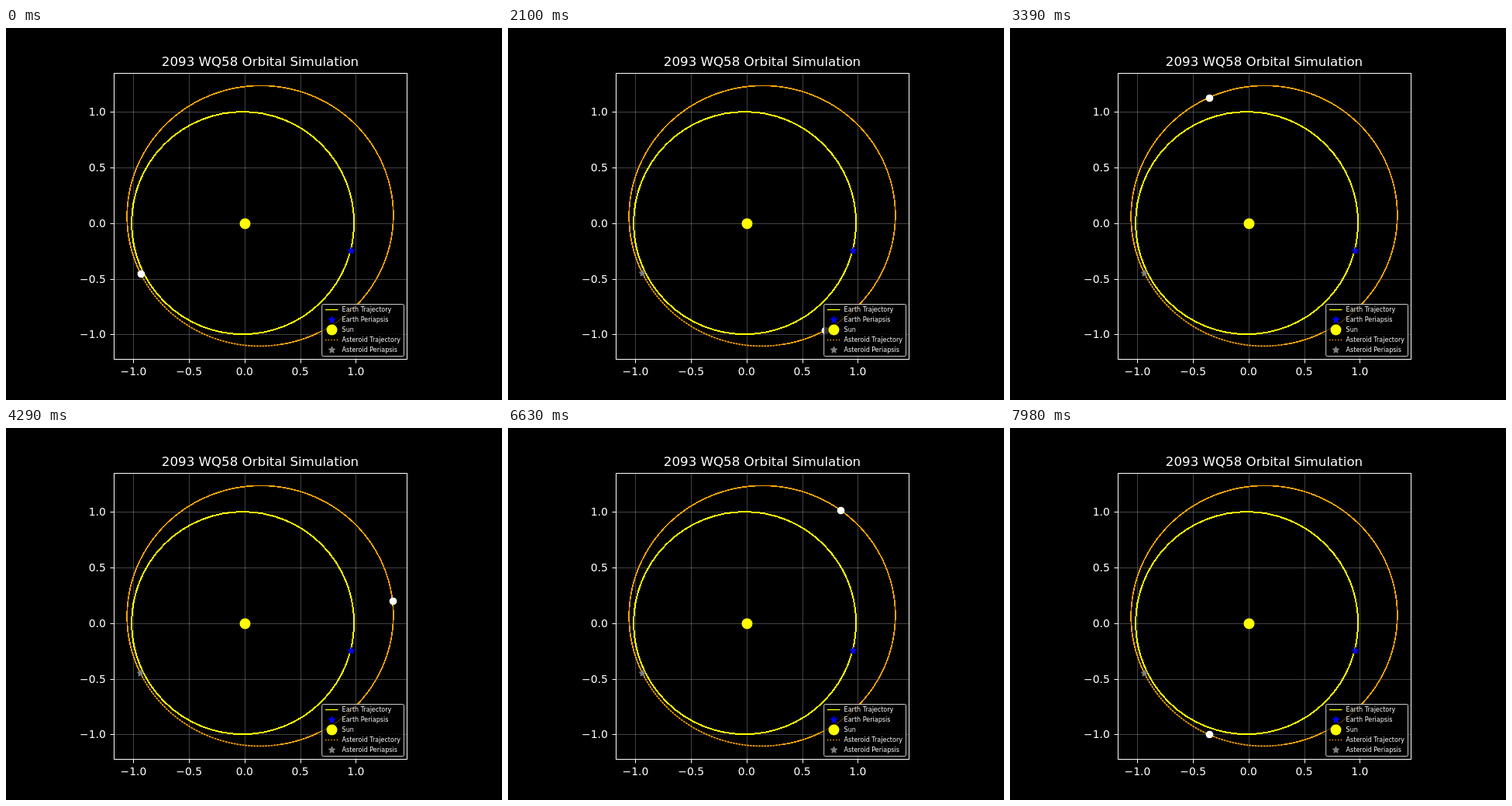
Recreate the animation shown at these times as an HTML page. Size 640x480 px, loop 8000 ms.

```html
<!DOCTYPE html>
<html lang="en">
<head>
<meta charset="utf-8">
<title>Orbital Simulation</title>
<style>
  html, body { margin: 0; width: 100%; height: 100%; overflow: hidden; background: #000; }
  svg { display: block; width: 640px; height: 480px; }
  text { font-family: "DejaVu Sans", sans-serif; font-size: 13.89px; fill: #fff; }
  .title { font-size: 16.67px; text-anchor: middle; }
  .x { text-anchor: middle; }
  .y { text-anchor: end; }
  .key text { font-size: 8.04px; }
  .grid { stroke: #fff; stroke-opacity: .26; }
  .axis { stroke: #fff; fill: none; }
  .earth { stroke: #ff0; fill: none; }
  .asteroid { stroke: orange; fill: none; stroke-width: 1.7; }
  .dotted { stroke-width: 1.39; stroke-dasharray: 1.39 2.29; }
  .crisp { shape-rendering: crispEdges; }
  .star { stroke-width: 1.39; stroke-linejoin: bevel; }
</style>
</head>
<body>
<svg viewBox="0 0 640 480">
  <text class="title" x="328" y="49">2093 WQ58 Orbital Simulation</text>
  <g id="axes"></g>
  <rect class="axis" x="139.5" y="58.5" width="378" height="369"/>
  <circle class="earth crisp" cx="305.6" cy="251.6" r="143.5" stroke-width="2"/>
  <path class="asteroid crisp" id="orbit"/>
  <path class="asteroid" id="orbitEnd" stroke-dasharray="2.8 0.9"/>
  <path class="star" data-at="445.5 287.5" fill="#00f" stroke="#00f"/>
  <circle cx="308.5" cy="252.5" r="6.95" fill="#ff0"/>
  <path class="star" data-at="173.5 316.5" fill="#808080" stroke="#808080"/>
  <circle id="body" r="4.86" fill="#fff"/>
  <g class="key">
    <rect x="407.7" y="356.5" width="105.8" height="67" rx="1.6" fill="#000" fill-opacity=".8" stroke="#ccc"/>
    <path class="earth" d="M412 363.5h16.5" stroke-width="1.39"/>
    <path class="star" data-at="420.5 376.5" fill="#00f" stroke="#00f"/>
    <circle cx="420.5" cy="389.5" r="6.95" fill="#ff0"/>
    <path class="asteroid dotted" d="M412 402.5h16.5"/>
    <path class="star" data-at="420.5 415.5" fill="#808080" stroke="#808080"/>
    <g id="labels"></g>
  </g>
</svg>
<script>
  const LOOP = 8000, STEP = 30;
  const RATE = 0.13098 * Math.PI / 180;   // mean motion per ms
  const ECC = 0.1295;
  const UNIT = 143.5, SUN = [307.9, 251.95];
  const center = [328, 242.4];
  const major = [-154.5, 74.1], minor = [-75.1, -150.8];
  const $ = id => document.getElementById(id);
  const snap = v => Math.round(v) + 0.5;   // nearest pixel centre

  function add(parent, tag, attrs, text = '') {
    const node = document.createElementNS('http://www.w3.org/2000/svg', tag);
    for (const key in attrs) node.setAttribute(key, attrs[key]);
    node.textContent = text;
    parent.append(node);
  }

  // Grid, ticks and tick labels
  const format = v => v.toFixed(1).replace('-', '\u2212');
  for (const v of [-1, -0.5, 0, 0.5, 1]) {
    const x = SUN[0] + UNIT * v, y = SUN[1] - UNIT * v;
    const px = snap(x), py = snap(y);
    add($('axes'), 'path', { class: 'grid', d: `M${px} 59V427M140 ${py}H517` });
    add($('axes'), 'path', { class: 'axis', d: `M${px} 428v4.5M139 ${py}h-4.5` });
    add($('axes'), 'text', { class: 'x', x, y: 447.5 }, format(v));
    add($('axes'), 'text', { class: 'y', x: 128.8, y: py + 4.8 }, format(v));
  }

  ['Earth Trajectory', 'Earth Periapsis', 'Sun', 'Asteroid Trajectory', 'Asteroid Periapsis']
    .forEach((name, i) => add($('labels'), 'text', { x: 433.6, y: 366.2 + 13 * i }, name));

  for (const star of document.querySelectorAll('.star')) {
    const [x, y] = star.dataset.at.split(' ').map(Number);
    const points = Array.from({ length: 10 }, (_, i) => {
      const r = i % 2 ? 1.59 : 4.17, a = i * Math.PI / 5;
      return `${x + r * Math.sin(a)} ${y - r * Math.cos(a)}`;
    });
    star.setAttribute('d', `M${points.join('L')}Z`);
  }

  // Position on the projected orbit for an eccentric anomaly
  const orbitPoint = E => center.map((c, i) => c + major[i] * Math.cos(E) + minor[i] * Math.sin(E));

  function arc(from, to) {
    const points = [];
    for (let deg = from; deg <= to; deg++) points.push(orbitPoint(deg * Math.PI / 180).join(' '));
    return 'M' + points.join('L');
  }
  $('orbit').setAttribute('d', arc(0, 288));
  $('orbitEnd').setAttribute('d', arc(288, 360));

  function solveKepler(M) {
    let E = M;
    for (let i = 0; i < 8; i++) E = M + ECC * Math.sin(E);
    return E;
  }

  function draw() {
    const t = Math.floor(performance.now() % LOOP / STEP) * STEP;
    const [x, y] = orbitPoint(solveKepler(t * RATE)).map(snap);
    $('body').setAttribute('cx', x);
    $('body').setAttribute('cy', y);
    requestAnimationFrame(draw);
  }
  draw();
</script>
</body>
</html>
```
